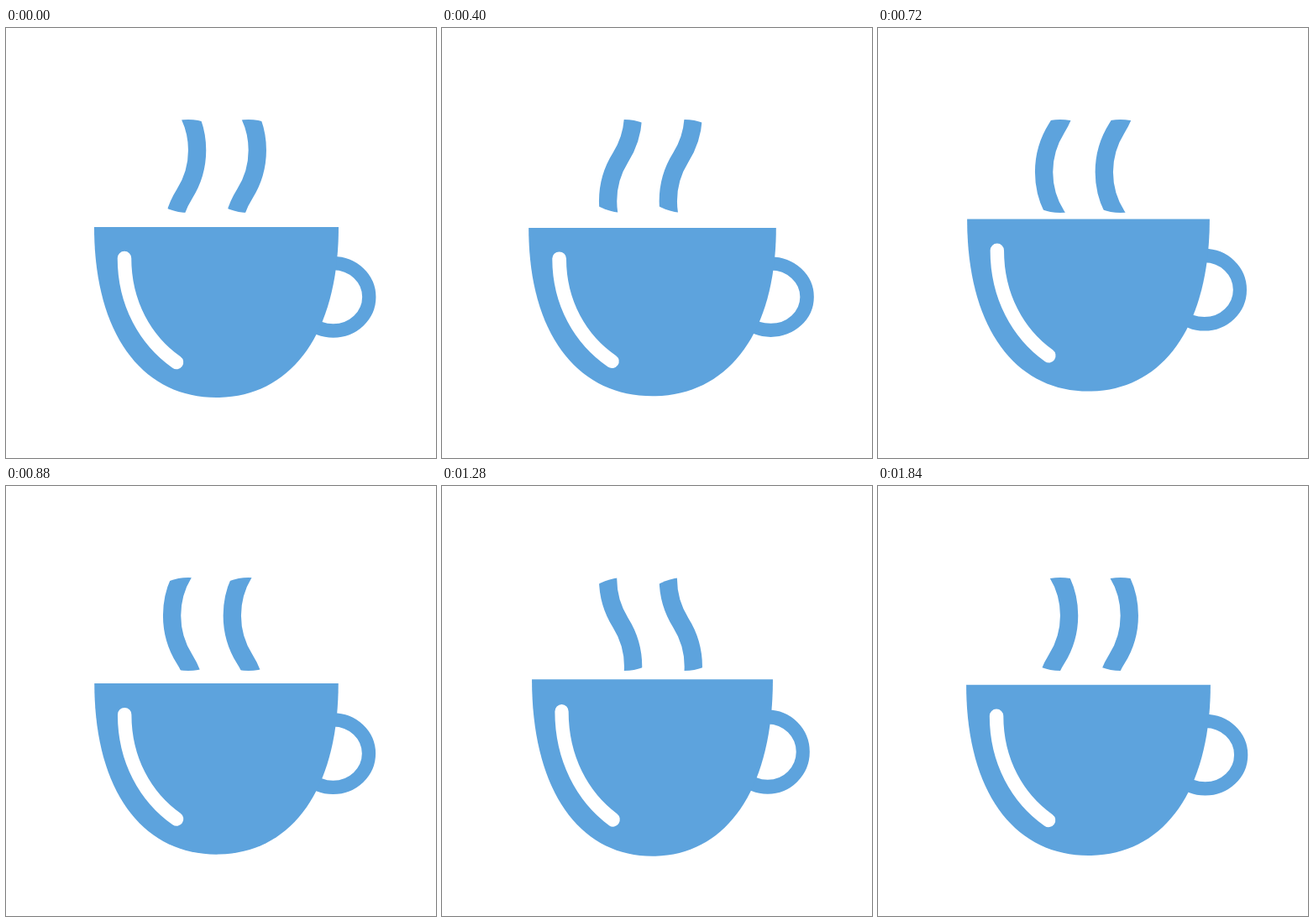
An HTML page that plays this animation: 512x512 px, repeating every 1920 ms.

```html
<!DOCTYPE html>
<html lang="en">
<head>
<meta charset="utf-8">
<title>Coffee cup</title>
<style>
  html, body { margin: 0; width: 100%; height: 100%; overflow: hidden; background: #fff; }
  svg { display: block; width: 100%; height: 100%; }
</style>
</head>
<body>
<svg viewBox="0 0 512 512" fill="none" stroke="#5da3dd">
  <defs>
    <clipPath id="window"><ellipse cx="217" cy="164.5" rx="60" ry="55.5"/></clipPath>
    <g id="steam" clip-path="url(#window)"><path id="wave" stroke-width="21.3"/></g>
  </defs>
  <use href="#steam"/>
  <use href="#steam" x="71.7"/>
  <g id="cup">
    <ellipse cx="389.7" cy="320.3" rx="42.6" ry="40.2" stroke-width="16.3"/>
    <path fill="#5da3dd" stroke="none" d="M105 237H396C396 365 338.5 440 250.5 440S105 365 105 237Z"/>
    <path stroke="#fff" stroke-width="16.5" stroke-linecap="round" d="M141 274C141 328 166 372 203 398"/>
  </g>
</svg>
<script>
  const LOOP = 1920, STEP = 80;
  const HALF_WAVE = 104, RADIUS = 97.6;
  const wave = document.getElementById('wave');
  const cup = document.getElementById('cup');

  // Two wavelengths of arcs that bulge right and left in turn
  const arc = sweep => `a${RADIUS} ${RADIUS} 0 0 ${sweep} 0 ${HALF_WAVE}`;
  wave.setAttribute('d', 'M212.6 93.5' + (arc(1) + arc(0)).repeat(2));

  function smooth(u) {
    u = Math.min(1, Math.max(0, u));
    return u * u * (3 - 2 * u);
  }

  // Rises from 0 to 1 at the peak and falls back to 0
  function pulse(t, from, peak, to) {
    return smooth(t < peak ? (t - from) / (peak - from) : (to - t) / (to - peak));
  }

  function draw(now) {
    const t = Math.floor(now % LOOP / STEP) * STEP;
    const squash = pulse(t, 0, 320, 640);
    const hop = pulse(t, 320, 640, 960);
    const stretch = pulse(t, 840, 1280, LOOP);
    const scaleX = 1 + 0.0165 * squash - 0.009 * hop - 0.014 * stretch;
    const scaleY = 1 - 0.018 * squash + 0.012 * hop + 0.037 * stretch;

    wave.setAttribute('transform', `translate(0 ${-2 * HALF_WAVE * t / LOOP})`);
    cup.setAttribute('transform',
      `translate(250.7 ${420 - 9 * hop}) scale(${scaleX} ${scaleY}) translate(-250.7 -420)`);
  }

  const start = performance.now();
  function tick() {
    draw(performance.now() - start);
    requestAnimationFrame(tick);
  }
  tick();
</script>
</body>
</html>
```
